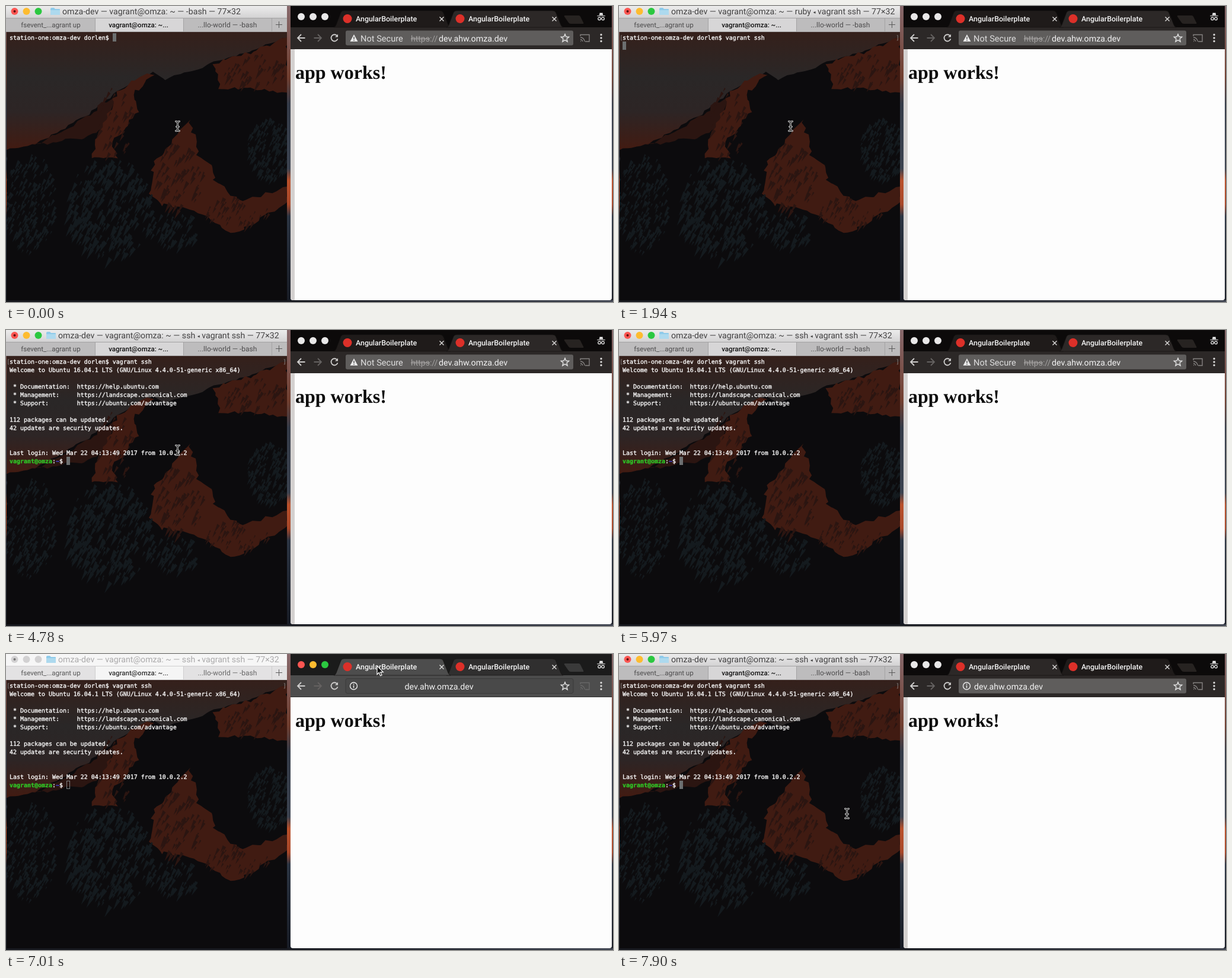
Animation, 1024 px wide and 500 px high, one loop 8000 ms. Source, as an HTML page:

```html
<!DOCTYPE html>
<html lang="en">
<head>
<meta charset="utf-8">
<title>Terminal and browser</title>
<style>
  html, body { margin: 0; width: 100%; height: 100%; overflow: hidden; background: #111; }
  svg { display: block; width: 100vw; height: 100vh; text-rendering: geometricPrecision; }
  text { white-space: pre; }
  .ui { font-family: Roboto, "Open Sans", sans-serif; }
  .mono { font: 9.967px "DejaVu Sans Mono", "Noto Sans Mono", monospace; fill: #fbfbfb; stroke: #fbfbfb; stroke-width: .35; }
  .line { fill: none; stroke-width: 1.8; }
  .thin { fill: none; stroke-width: 1.4; }
</style>
</head>
<body>
<svg id="stage" viewBox="0 0 1024 500" preserveAspectRatio="none">
  <defs>
    <linearGradient id="desk" x2="0" y2="1">
      <stop offset="0" stop-color="#86686b"/><stop offset=".24" stop-color="#713f30"/>
      <stop offset=".33" stop-color="#343b48"/><stop offset=".55" stop-color="#3c4350"/>
      <stop offset=".59" stop-color="#b9502b"/><stop offset=".67" stop-color="#a8482a"/>
      <stop offset=".71" stop-color="#2c3543"/><stop offset="1" stop-color="#171b24"/>
    </linearGradient>
    <linearGradient id="floor">
      <stop offset=".45" stop-color="#16181e"/><stop offset="1" stop-color="#434854"/>
    </linearGradient>
    <linearGradient id="sky" x2="0" y2="1">
      <stop offset="0" stop-color="#35201b"/><stop offset=".38" stop-color="#2a2727"/>
      <stop offset=".66" stop-color="#2d2525"/><stop offset="1" stop-color="#441a10"/>
    </linearGradient>
    <linearGradient id="barOn" x2="0" y2="1">
      <stop offset="0" stop-color="#ececec"/><stop offset="1" stop-color="#d3d2d3"/>
    </linearGradient>
    <clipPath id="termClip"><rect x="1" y="43" width="473" height="454"/></clipPath>
  </defs>

  <rect width="1024" height="500" fill="url(#desk)"/>
  <rect y="497" width="1024" height="3" fill="url(#floor)"/>

  <g id="photo" clip-path="url(#termClip)">
    <rect y="43" width="475" height="205" fill="url(#sky)"/>
  </g>

  <g class="ui">
    <rect id="bar" width="474" height="20"/>
    <rect id="tabsOff" y="20" width="474" height="23"/>
    <rect id="tabOn" x="151" y="20" width="149" height="23"/>
    <path id="tabLines" d="M0 20.5H474M0 43.5H474M150.5 20V43M299.5 20V43M448.5 20V43" fill="none"/>
    <g id="termLights"></g>
    <circle id="dot" cx="14.5" cy="9" r="2"/>
    <g id="heading">
      <path d="M-20 5q0-2 2-2h4l2 2h7q1 0 1 1v8q0 1-1 1h-14q-1 0-1-1z" fill="#8fcbea"/>
      <path d="M-20 7H-4V14q0 1-1 1h-14q-1 0-1-1z" fill="#add9ee"/>
      <text id="title" y="14.3" font-size="14.15"></text>
    </g>
    <g font-size="11.5" text-anchor="middle">
      <text id="sideTab" x="75.5" y="36">fsevent_...agrant up</text>
      <text id="mainTab" x="223.5" y="36" font-weight="500">vagrant@omza: ~...</text>
      <text id="lastTab" x="373.5" y="36" font-size="12">...llo-world — -bash</text>
    </g>
    <path d="M455 31.5H466M460.5 26V37" stroke="#5a5a5a" fill="none"/>
  </g>

  <g id="lines"></g>
  <g id="brackets" class="mono" style="fill:#8a8786;stroke:none"><text x="1" y="57">[</text><text x="467" y="57">]</text></g>
  <rect id="block"/>

  <path id="frame" d="M480 0H1022V40H480z"/>
  <g id="winLights"></g>
  <path id="plus" d="M943 16H966Q968 16 969 18L974 28Q975 30 973 30H953Q950 30 949 28L942 18Q941 16 943 16z"/>
  <rect id="tools" x="480" y="36" width="542" height="37"/>
  <g id="browserTabs"></g>
  <g fill="#ededed" stroke="#ededed" transform="translate(1004 18) scale(.85)">
    <path d="M-4-3L-2.500-8Q0-6.500 2.500-8L4-3zM-8-2H8V-1H-8z" stroke="none"/>
    <g class="thin"><circle cx="-3.500" cy="4" r="2.700"/><circle cx="3.500" cy="4" r="2.700"/></g>
  </g>
  <g class="line" stroke="#cfcecd">
    <path d="M504.500 54H492.500M498 48L492 54L498 60"/>
    <path d="M519.500 54H531.500M526 48L532 54L526 60" stroke="#656261"/>
    <path d="M558.200 50A5.600 5.600 0 1 0 559.500 55.500"/><path d="M560 47.500V52.500H555z" fill="#cfcecd" stroke="none"/>
  </g>
  <rect id="field" x="573" y="41.500" width="384" height="25" rx="3"/>
  <g class="ui" font-size="14.25" fill="#f3f3f3">
    <g id="insecure">
      <path d="M587 48L593.500 60H580.500z" fill="#e9e9e9"/><path d="M587 52V56M587 57.200V58.700" stroke="#555" stroke-width="1.500"/>
      <text x="598" y="59.500" font-size="14.600" fill="#dedede">Not Secure</text>
      <text x="683" y="59.500" font-size="14" fill="#a3a1a0"><tspan text-decoration="line-through">https</tspan>://</text>
    </g>
    <g id="info" class="thin" stroke="#ededed"><circle cx="586.500" cy="54" r="6"/><path d="M586.500 53V57.500M586.500 50.300V52"/></g>
    <text id="url" y="59.500">dev.ahw.omza.dev</text>
  </g>
  <path id="star" class="thin" stroke="#e4e4e4"/>
  <path id="cast" class="thin" d="M969 51V48.500H984V60H977M969 53A7 7 0 0 1 976 60M969 56.500A3.500 3.500 0 0 1 972.500 60M969 59.500H970"/>
  <path d="M1004 48.500h0m0 5.500h0m0 5.500h0" stroke="#d8d7d6" stroke-width="3.400" stroke-linecap="round"/>

  <path d="M480 73H1022V493Q1022 497 1018 497H484Q480 497 480 493z" fill="#fdfdfd"/>
  <path id="edge" d="M480 73H487V497H484Q480 497 480 493z" fill="#d4d1d0"/>
  <path id="rule" d="M480 72.500H1022" stroke="#2e2e2e"/>
  <text x="488" y="123" font-family="'Liberation Serif', serif" font-weight="700" font-size="32" fill="#0b0b0b">app works!</text>

  <path id="arrow" d="M0 0V14.500L3.300 11.400L5.600 16.800L8 15.800L5.700 10.600H10.300z" fill="#0b0b0b" stroke="#fff" stroke-width="1.200"/>
  <g id="beam" fill="none" stroke-linecap="round">
    <path id="beamOut" stroke="#dedede" stroke-width="2.800"/><path id="beamIn" stroke="#111" stroke-width="1.100"/>
  </g>
</svg>
<script>
const $ = id => document.getElementById(id);
const set = (id, attrs) => { for (const k in attrs) $(id).setAttribute(k, attrs[k]); };
const show = (id, on) => set(id, { visibility: on ? "visible" : "hidden" });
function add(parent, tag, attrs, content = "") {
  const el = document.createElementNS("http://www.w3.org/2000/svg", tag);
  for (const k in attrs) el.setAttribute(k, attrs[k]);
  el.innerHTML = content;
  $(parent).append(el);
  return el;
}

// Mountain backdrop: rough-edged flat shapes and seeded slivers
let seed = 7;
const rnd = () => (seed = seed * 16807 % 2147483647) / 2147483647 - .5;
function rock(fill, coords, rough = 7) {
  const p = coords.split(" ").map(s => s.split(","));
  const d = p.map(([x, y], i) => {
    const [u, v] = p[(i + 1) % p.length];
    const n = Math.ceil(Math.hypot(u - x, v - y) / 8);
    return Array.from({ length: n }, (_, k) =>
      `${+x + (u - x) * k / n + rnd() * rough} ${+y + (v - y) * k / n + rnd() * rough}`).join("L");
  }).join("L");
  add("photo", "path", { d: `M${d}z`, fill });
}
// Slivers spread over an ellipse, leaning down to the left
function slivers(fill, cx, cy, rx, ry, count, size) {
  let d = "";
  for (let i = 0; i < count; i++) {
    const a = rnd() * 2 * Math.PI, r = Math.sqrt(rnd() + .5), h = size * (1 + rnd());
    d += `M${cx + rx * r * Math.cos(a)} ${cy + ry * r * Math.sin(a)}l${h * .35} ${h * .3}l${-h * .8} ${h}z`;
  }
  add("photo", "path", { d, fill });
}
const DARK = "#0c0b0d", LIT = "#401b12", DIM = "#2b1511", BLUE = "#141a1e";
rock(DARK, "0,243 50,233 140,182 187,145 247,112 270,124 345,98 410,76 474,53 480,505 -5,505", 4);
rock(DIM, "50,235 140,184 187,147 170,200 140,222");
rock(LIT, "187,146 222,120 248,114 214,150 222,178 180,230 188,258 142,254 165,200");
rock(LIT, "350,98 410,78 474,54 476,150 430,140 360,137");
rock(LIT, "310,191 324,250 348,270 352,294 398,331 476,306 476,330 405,374 380,383 330,350 262,335 244,318 248,270");
slivers(DIM, 185, 195, 30, 60, 40, 9);
slivers(DIM, 420, 108, 55, 28, 50, 9);
slivers(DIM, 295, 285, 40, 60, 70, 10);
slivers(DIM, 390, 345, 55, 25, 50, 8);
slivers(BLUE, 445, 240, 38, 52, 170, 8);
slivers(BLUE, 40, 330, 45, 85, 220, 8);
slivers(BLUE, 175, 340, 75, 85, 300, 11);
slivers(BLUE, 285, 375, 45, 30, 70, 9);

function lights(id, x, y) {
  for (let i = 0; i < 3; i++) add(id, "circle", { cx: x + 20 * i, cy: y, r: 6 });
}
lights("termLights", 14.5, 9);
lights("winLights", 498, 18);

// Terminal output
const PROMPT = "station-one:omza-dev dorlen$ ";
const OUTPUT = `
Welcome to Ubuntu 16.04.1 LTS (GNU/Linux 4.4.0-51-generic x86_64)

 * Documentation:  https://help.ubuntu.com
 * Management:     https://landscape.canonical.com
 * Support:        https://ubuntu.com/advantage

112 packages can be updated.
42 updates are security updates.


Last login: Wed Mar 22 04:13:49 2017 from 10.0.2.2`.split("\n");
const row = (n, html) => add("lines", "text", { x: 6, y: 57 + n * 14, class: "mono" }, html);
const paint = (color, s) => `<tspan fill="${color}" stroke="${color}" font-weight="700">${s}</tspan>`;
const rows = OUTPUT.map((s, n) => row(n, s));
const command = rows.shift();
const remote = row(OUTPUT.length, paint("#2fc425", "vagrant@omza") + ":" + paint("#4343d8", "~") + "$ ");

// Browser tabs
function makeTab(id, x) {
  add("browserTabs", "g", { id, transform: `translate(${x} 0)` },
    `<path d="M0 36Q3 35 4 32L12 11Q13.500 8 17 8H179Q183 8 184.500 11L193 32Q194 35 197 36z" stroke="#151312" stroke-width=".7"/>
     <circle cx="23" cy="21.500" r="7.500" fill="#dc3029"/>
     <text class="ui" x="37" y="26" font-size="12.450" font-weight="500" fill="#f4f4f4">AngularBoilerplate</text>
     <path d="M178.500 18.500l7 7m0-7l-7 7" stroke="#dedddc" stroke-width="1.400"/>`);
}
makeTab("tabB", 743);
makeTab("tabA", 553);

set("star", { d: "M" + Array.from({ length: 10 }, (_, i) => {
  const a = i * Math.PI / 5, r = i % 2 ? 3.1 : 7;
  return `${943 + r * Math.sin(a)} ${54.5 - r * Math.cos(a)}`;
}).join("L") + "z" });
const BEAM = "M-3-8Q0-8 0-5.500V5.500Q0 8-3 8M3-8Q0-8 0-5.500M0 5.500Q0 8 3 8M-2 1H2";
set("beamOut", { d: BEAM });
set("beamIn", { d: BEAM });

// Timelines: [start, value]
const at = (keys, t) => keys.reduce((v, [start, value]) => t >= start ? value : v, keys[0][1]);
const TYPED = [[0, ""], [750, "v"], [900, "vag"], [1200, "vagrant "], [1340, "vagrant s"], [1490, "vagrant ss"], [1640, "vagrant ssh"]];
const JOBS = [[0, "-bash"], [1940, "ruby"], [4040, "VBoxManage"], [4330, "ruby"], [4480, "ssh"]];
const POINTER = [
  [0, ["beam", 289.5, 203]], [5830, ["beam", 289.5, 201.5]], [5970, null],
  [6270, ["arrow", 782, 29]], [6420, ["arrow", 758, 26]], [6560, ["arrow", 667, 22]],
  [6710, ["arrow", 626, 20]], [7300, ["arrow", 607, 26]], [7450, ["arrow", 298.5, 224.5]],
  [7900, ["beam", 384.5, 269.5]]
];
// The address slides left once the warning is gone
const urlX = t => t < 7010 ? 730 : 599 + 73 * Math.max(0, 1 - (t - 7010) / 145) + (t < 7300 ? 1 : 0);

function titleText(job) {
  const start = "omza-dev — vagrant@omza: ~ — " + job;
  if (job === "-bash") return start + " — 77×32";
  return start + ' <tspan font-size="8" dy="-1">◂</tspan><tspan dy="1"> vagrant ssh' + (job === "VBoxManage" ? "..." : " — 77×32") + "</tspan>";
}

const fillAll = (id, colors) => [...$(id).children].forEach((c, i) => c.setAttribute("fill", colors[i]));
const LIGHTS = ["#fc5652", "#fdbc30", "#2bc840"];
let lastJob;

function drawTerminal(t, active) {
  const fill = (id, on, off) => set(id, { fill: active ? on : off });
  fill("bar", "url(#barOn)", "#f6f6f6");
  fill("tabsOff", "#bdbcbd", "#e3e2e3");
  fill("tabOn", "#d7d6d7", "#f5f5f5");
  fill("dot", "#5c1010", "#777");
  fill("title", "#414041", "#aaa9aa");
  fill("sideTab", "#4c4b4c", "#555");
  fill("mainTab", "#111", "#333");
  fill("lastTab", "#4c4b4c", "#666");
  set("tabLines", { stroke: active ? "#a3a2a3" : "#cecdce" });
  fillAll("termLights", active ? LIGHTS : Array(3).fill("#d2d1d2"));

  const job = at(JOBS, t);
  if (job !== lastJob) $("title").innerHTML = titleText(lastJob = job);
  set("title", { "letter-spacing": job === "VBoxManage" ? -.2 : 0 });
  set("heading", { transform: `translate(${job === "-bash" ? 95 : 88} 0)` });

  const typed = at(TYPED, t);
  command.textContent = PROMPT + typed;
  rows.forEach(el => el.setAttribute("visibility", t >= 4630 ? "visible" : "hidden"));
  remote.setAttribute("visibility", t >= 4780 ? "visible" : "hidden");
  show("brackets", t >= 1200);

  const [col, line] = t < 1940 ? [PROMPT.length + typed.length, 0] : t < 4630 ? [0, 1] : t < 4780 ? [0, 12] : [16, 12];
  const inset = active ? 0 : .5;
  set("block", {
    x: 6 + col * 6 + inset, y: 46 + line * 14 + inset, width: 6 - 2 * inset, height: 14 - 2 * inset,
    fill: active ? "#6c6f70" : "none", stroke: active ? "none" : "#818384"
  });
}

function drawBrowser(t, active) {
  const first = t >= 7010;
  const on = active ? "#4d4d4d" : "#2c2827", off = active ? "#302f2f" : "#1f1b1a";
  const hover = at([[0, off], [6560, "#272322"], [6710, "#2d2a29"]], t);
  set("frame", { fill: active ? "#1b1b1b" : "#0c0a0a" });
  set("tools", { fill: on });
  set("plus", { fill: active ? "#3a3a3a" : "#272321" });
  set("field", { fill: active ? "#494949" : "#5f5d5c", stroke: active ? "#3a3a3a" : "none" });
  set("cast", { stroke: active ? "#686868" : "#858281" });
  fillAll("winLights", active ? LIGHTS : Array(3).fill("#e9e8e8"));
  $("tabA").firstChild.setAttribute("fill", first ? on : hover);
  $("tabB").firstChild.setAttribute("fill", first ? off : on);
  const front = $(first ? "tabA" : "tabB");
  if ($("browserTabs").lastChild !== front) $("browserTabs").append(front);
  show("insecure", !first);
  show("info", first);
  set("url", { x: urlX(t) });
  show("edge", !active);
  show("rule", active);
}

function draw(t) {
  const browsing = t >= 7010 && t < 7750;
  drawTerminal(t, !browsing);
  drawBrowser(t, browsing);
  const p = at(POINTER, t);
  for (const id of ["arrow", "beam"]) show(id, p && p[0] === id);
  if (p) set(p[0], { transform: `translate(${p[1]} ${p[2]})` });
}

const began = performance.now();
function tick() {
  draw((performance.now() - began) % 8000);
  requestAnimationFrame(tick);
}
tick();
</script>
</body>
</html>
```
